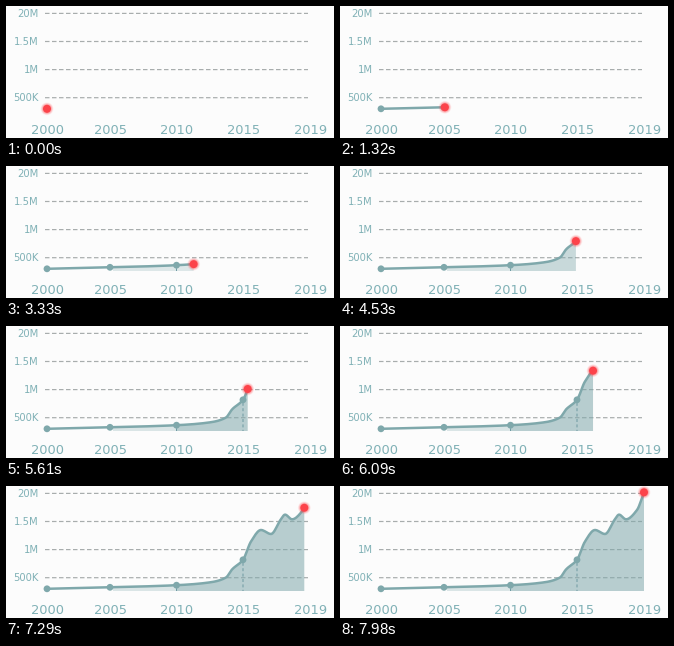
A matplotlib script that plays this animation: 328 px wide and 132 px high, repeating every 8000 ms.

```python
import numpy as np
import matplotlib.pyplot as plt
from matplotlib.animation import FuncAnimation
from matplotlib.patches import Circle, Polygon

W, H, DPI = 328, 132, 100
LOOP, STEP = 8000, 20
PX = 72 / DPI
BG, TEAL, LABEL, GRID, RED = "#fcfcfc", "#7fa8ab", "#80b1b6", "#a8adad", "#fc434a"
BASE = 105

STOPS = [41, 104, 170.5, 237, 304]
LEGS = [(0, 830), (1230, 2530), (2700, 4700), (5000, 8000)]  # ms, stop to stop
KEYS = [(41, 102.8), (104, 101.3), (170.5, 99.2), (205, 96.2), (220, 91.5),
        (226, 83.5), (237, 73.8), (245, 55.5), (255, 44), (265, 48),
        (275, 33.2), (279, 28.6), (286, 33.3), (297, 24), (304, 6.3)]


def smooth(points):
    """Shape-preserving cubic through the points."""
    x, y = np.array(points, float).T
    h = np.diff(x)
    d = np.diff(y) / h
    m = np.zeros_like(x)
    m[0], m[-1] = d[0], d[-1]
    for i in range(1, len(x) - 1):
        if d[i - 1] * d[i] > 0:
            a, b = 2 * h[i] + h[i - 1], h[i] + 2 * h[i - 1]
            m[i] = (a + b) / (a / d[i - 1] + b / d[i])

    def at(q):
        q = np.clip(q, x[0], x[-1])
        i = np.clip(np.searchsorted(x, q, side="right") - 1, 0, len(h) - 1)
        s = (q - x[i]) / h[i]
        return ((1 + 2 * s) * (1 - s) ** 2 * y[i] + s * (1 - s) ** 2 * h[i] * m[i]
                + s * s * (3 - 2 * s) * y[i + 1] + s * s * (s - 1) * h[i] * m[i + 1])
    return at


curve = smooth(KEYS)
path_x = np.linspace(STOPS[0], STOPS[-1], 2000)
path_len = np.r_[0, np.cumsum(np.hypot(np.diff(path_x), np.diff(curve(path_x))))]
stop_len = np.interp(STOPS, path_x, path_len)


def ramp(t, start, end):
    return float(np.clip((t - start) / (end - start), 0, 1))


def travel(t):
    """Eased distance along the curve, as an x position."""
    dist = 0
    for (start, end), length in zip(LEGS, np.diff(stop_len)):
        s = ramp(t, start, end)
        dist += length * s * s * (3 - 2 * s)
    return float(np.interp(dist, path_len, path_x))


fig = plt.figure(figsize=(W / DPI, H / DPI), dpi=DPI, facecolor=BG)
ax = fig.add_axes([0, 0, 1, 1])
ax.set(xlim=(0, W), ylim=(H, 0))
ax.axis("off")


def label(x, y, text, size, align):
    ax.text(x, y, text, fontsize=size * PX, color=LABEL, ha=align,
            va="baseline", family="DejaVu Sans")


def disc(x, y, radius, color, z, alpha=1):
    return ax.add_patch(Circle((x, y), radius, color=color, lw=0, alpha=alpha, zorder=z))


def dashes(x, y, color, width, on, off, z):
    return ax.plot(x, y, color=color, lw=width * PX, zorder=z, snap=False,
                   dashes=(on / width, off / width), dash_capstyle="butt")[0]


def area():
    return ax.add_patch(Polygon([(0, 0)] * 3, facecolor=TEAL, lw=0, zorder=2))


for k, name in enumerate(["20M", "1.5M", "1M", "500K"]):
    y = 7.4 + 28.1 * k
    dashes([39, 302], [y, y], GRID, 1.2, 4.5, 2.5, 1)
    label(32.7, y + 3.5, name, 10, "right")
for x, year in zip(STOPS, [2000, 2005, 2010, 2015, 2019]):
    label(x + 0.2, 127.6, str(year), 13, "center")

early, late = area(), area()
drops = [dashes([x, x], [curve(x) + 3, BASE], "#6f9ba3", 1, 3, 2.4, 3)
         for x in STOPS[2:4]]
line, = ax.plot([], [], color=TEAL, lw=2.5 * PX, zorder=4, snap=False,
                solid_capstyle="butt", solid_joinstyle="round")
marks = [disc(x, curve(x), 3.4, TEAL, 5) for x in STOPS[:4]]
dot = [disc(0, 0, 4.6 + 0.6 * k, RED, 6, 0.2 - 0.04 * k) for k in range(4)]
dot.append(disc(0, 0, 4, RED, 7))


def fill(patch, left, right, alpha):
    patch.set_visible(right > left and alpha > 0)
    if patch.get_visible():
        x = np.linspace(left, right, 160)
        patch.set_xy(np.column_stack([np.r_[left, x, right],
                                      np.r_[BASE, curve(x), BASE]]))
        patch.set_alpha(alpha)


def draw(i):
    t = i * STEP
    x = travel(t)
    xs = np.linspace(STOPS[0], x, 260)
    line.set_data(xs, curve(xs))
    light = 0.27 * ramp(t, 2500, 3400)
    deep = light + 0.14 * ramp(t, 3500, 4500) + 0.14 * ramp(t, 4890, 5500)
    fill(early, 107, min(x, STOPS[2]), light)
    fill(late, STOPS[2], x, deep)
    drops[0].set_alpha(ramp(t, 2500, 3100))
    drops[1].set_alpha(ramp(t, 4890, 5400))
    for stop, mark in zip(STOPS, marks):
        mark.set_visible(x >= stop - 0.01)
    for part in dot:
        part.center = x, float(curve(x))
    return [early, late, line, *drops, *marks, *dot]


anim = FuncAnimation(fig, draw, frames=LOOP // STEP, interval=STEP,
                     repeat=True, repeat_delay=0, blit=False)
plt.show()
```
